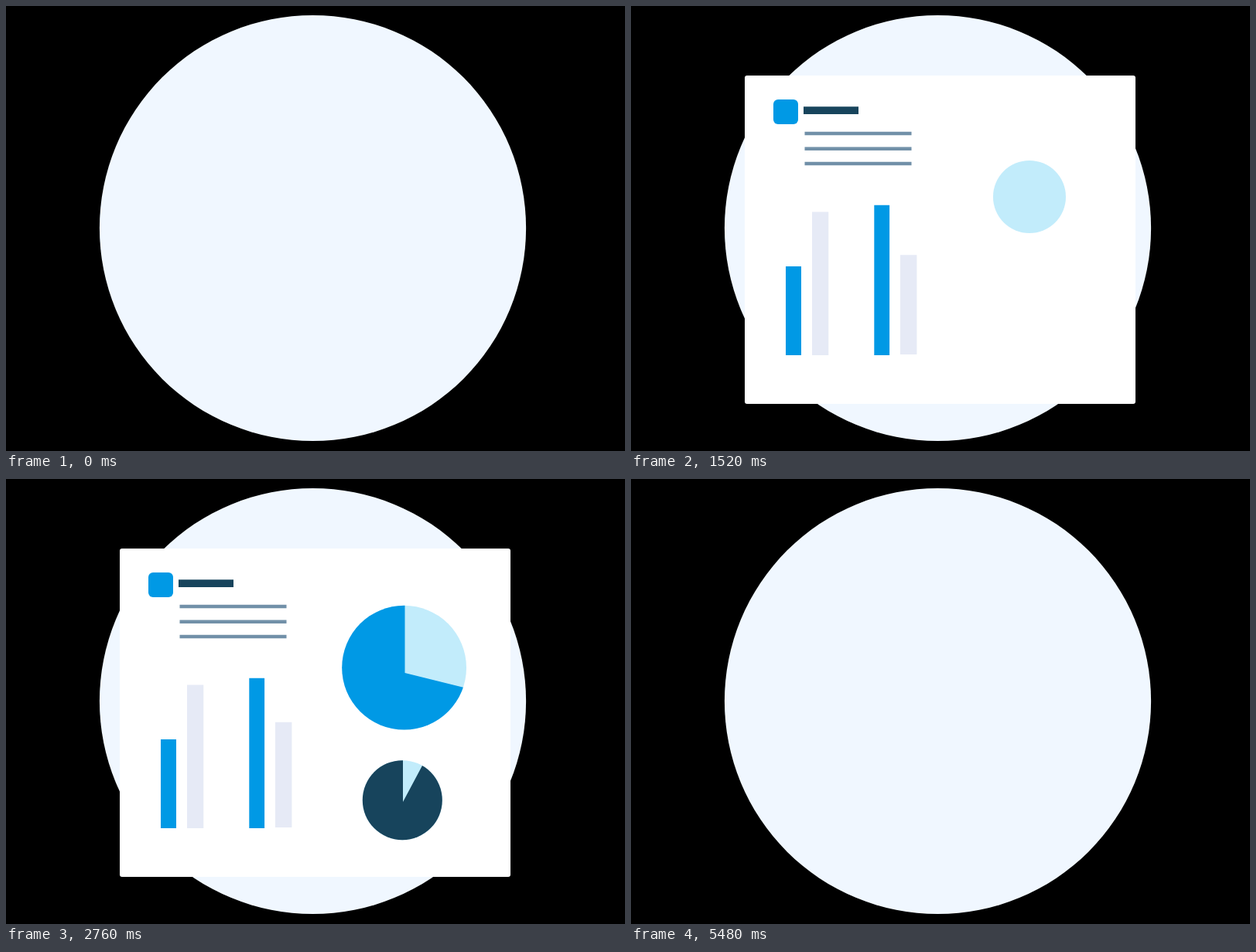
Recreate the animation shown at these times as an HTML page with a canvas. Size 800 by 576 pixels, loop 5.8 s.

```html
<!DOCTYPE html>
<html lang="en">
<head>
<meta charset="utf-8">
<title>Report card</title>
<style>
  html, body { margin: 0; width: 100%; height: 100%; overflow: hidden; background: #000; }
  canvas { display: block; }
</style>
</head>
<body>
<canvas id="stage" width="800" height="576"></canvas>
<script>
const ctx = document.getElementById('stage').getContext('2d');
const LOOP = 5800, STEP = 40;
const BLUE = '#0099e5', DARK = '#17445c', LIGHT = '#c2ecfb', GREY = '#e6eaf6', LINE = '#7190a8';

const sine = u => (1 - Math.cos(Math.PI * u)) / 2;

// cubic-bezier(.25, .1, .25, 1)
function ease(x) {
  let lo = 0, hi = 1;
  for (let i = 0; i < 24; i++) {
    const s = (lo + hi) / 2;
    if (0.75 * s * (1 - s) + s ** 3 < x) lo = s; else hi = s;
  }
  return 0.3 * lo * (1 - lo) ** 2 + 3 * lo * lo * (1 - lo) + lo ** 3;
}

function progress(t, start, duration, curve) {
  const u = (t - start) / duration;
  return u <= 0 ? 0 : u >= 1 ? 1 : curve(u);
}

const bars = [
  { x: 200, w: 20, top: 337, bottom: 452, color: BLUE, start: 300 },
  { x: 314.3, w: 19.8, top: 257.8, bottom: 452, color: BLUE, start: 507 },
  { x: 234, w: 21.3, top: 266.5, bottom: 452, color: GREY, start: 800 },
  { x: 348, w: 21.4, top: 314.8, bottom: 451, color: GREY, start: 1094 }
];

const pies = [
  { cx: 514.6, cy: 244.2, r: 80.4, ax: 515.5, ay: 251, sweep: 256, color: BLUE,
    grow: [1311, 377, sine], fill: [1600, 450, sine] },
  { cx: 512.3, cy: 415.7, r: 51.5, ax: 513, ay: 418, sweep: 332, color: DARK,
    grow: [1738, 386, sine], fill: [2063, 675, ease] }
];

function rect(x, y, w, h, color, radius = 0) {
  ctx.fillStyle = color;
  ctx.beginPath();
  ctx.roundRect(x, y, w, h, radius);
  ctx.fill();
}

function disc(x, y, r, color) {
  ctx.fillStyle = color;
  ctx.beginPath();
  ctx.arc(x, y, r, 0, 2 * Math.PI);
  ctx.fill();
}

function scaleAbout(x, y, s) {
  ctx.translate(x, y);
  ctx.scale(s, s);
  ctx.translate(-x, -y);
}

function drawPie(p, t) {
  const size = progress(t, ...p.grow);
  if (!size) return;
  ctx.save();
  scaleAbout(p.ax, p.ay, size);
  disc(p.cx, p.cy, p.r, LIGHT);
  const angle = progress(t, ...p.fill) * p.sweep * Math.PI / 180;
  if (angle) {
    ctx.clip();
    ctx.fillStyle = p.color;
    ctx.beginPath();
    ctx.moveTo(p.ax, p.ay);
    ctx.arc(p.ax, p.ay, p.r * 1.5, -Math.PI / 2, -Math.PI / 2 - angle, true);
    ctx.fill();
  }
  ctx.restore();
}

function drawCard(t) {
  const size = progress(t, 200, 240, sine) - progress(t, 5264, 216, sine);
  if (size <= 0) return;
  ctx.save();
  scaleAbout(399, 302, size);
  rect(147, 90, 505, 425, '#fff', 3);
  rect(184, 121, 32, 32, BLUE, 6);
  rect(223, 130.2, 71 * progress(t, 375, 450, ease), 9.8, DARK);
  const lineWidth = 138 * progress(t, 605, 195, sine);
  for (const y of [162.7, 182.6, 201.7]) rect(224.5, y, lineWidth, 4.5, LINE);
  for (const b of bars) {
    const h = (b.bottom - b.top) * progress(t, b.start, 600, ease);
    rect(b.x, b.bottom - h, b.w, h, b.color);
  }
  for (const p of pies) drawPie(p, t);
  ctx.restore();
}

function frame() {
  const t = Math.floor(performance.now() % LOOP / STEP) * STEP;
  ctx.clearRect(0, 0, 800, 576);
  disc(396.5, 287.5, 275.6, '#f0f7ff');
  drawCard(t);
  requestAnimationFrame(frame);
}
frame();
</script>
</body>
</html>
```
